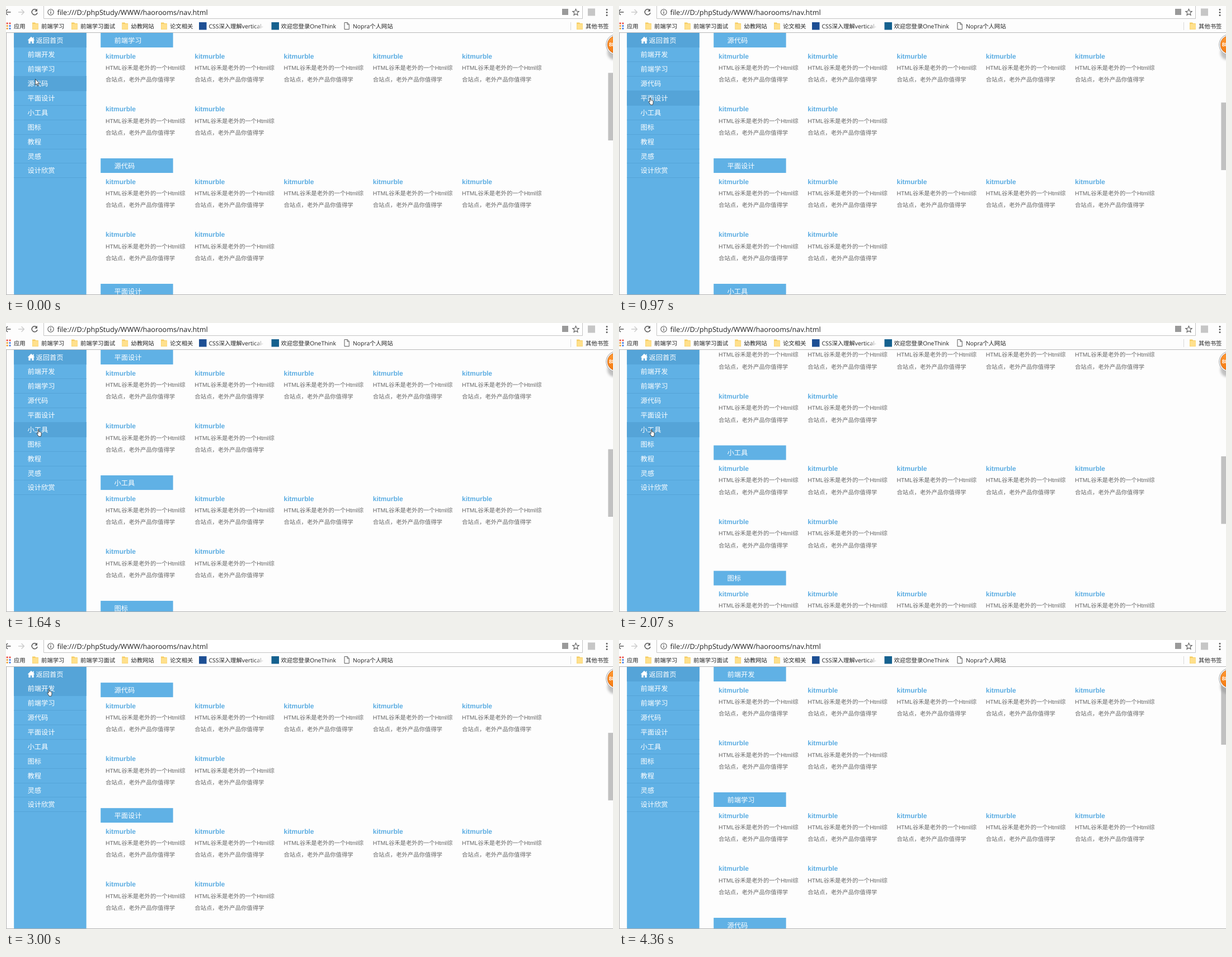
Write an HTML page that moves like this. It is 1085 by 516 pixels and loops after 4780 ms.

```html
<!DOCTYPE html>
<html lang="zh-CN">
<head>
<meta charset="utf-8">
<title>nav</title>
<style>
html, body { margin: 0; width: 100%; height: 100%; overflow: hidden; background: #fdfdfd; }
svg { display: block; width: 1085px; height: 516px; }
text { white-space: pre; cursor: default; text-rendering: geometricPrecision; }
.page text { font: 10.35px "Liberation Sans", "Noto Sans CJK SC", "Noto Sans CJK", sans-serif; fill: #666; }
.page .head { font-size: 12.25px; fill: #fff; }
.page .name { font-size: 12px; font-weight: bold; fill: #5cade2; }
.bar text { font: 10.35px "Open Sans", "Noto Sans CJK SC", "Noto Sans CJK", sans-serif; fill: #222; }
.bar .url { font-size: 12.65px; }
</style>
</head>
<body>
<svg id="stage" viewBox="0 0 1085 516" xmlns="http://www.w3.org/2000/svg">
  <defs>
    <clipPath id="view"><rect x="1" y="48" width="1084" height="467"/></clipPath>
    <linearGradient id="fade" x1="0" x2="1">
      <stop offset="0" stop-color="#fdfdfd" stop-opacity="0"/>
      <stop offset="1" stop-color="#fdfdfd"/>
    </linearGradient>
    <linearGradient id="ball" x1="0" y1="0" x2="0" y2="1">
      <stop offset="0" stop-color="#ff9a35"/>
      <stop offset="1" stop-color="#f57a10"/>
    </linearGradient>
    <filter id="soft" x="-50%" y="-50%" width="200%" height="200%"><feGaussianBlur stdDeviation="2"/></filter>
  </defs>
  <rect width="1085" height="516" fill="#fdfdfd"/>

  <g class="page" clip-path="url(#view)">
    <g id="list"></g>
    <rect id="thumb" x="1076.3" y="66.4" width="9" height="120.6" fill="#c1c1c1"/>
    <rect x="14.2" y="48" width="129.4" height="468" fill="#60b1e5"/>
    <rect x="14.2" y="48" width="129.4" height="26" fill="#55a4d8"/>
    <rect id="hover" x="14.2" y="48" width="129.4" height="26" fill="#55a4d8"/>
    <g id="menu"></g>
    <path d="M45 54.8L38.6 61.2H40.4V67H43.7V63.2H46.3V67H49.6V61.2H51.4L49.6 59.4V55.8H48V57.8Z" fill="#fff"/>
    <ellipse cx="1087" cy="83" rx="12" ry="13" fill="#999" opacity=".6" filter="url(#soft)"/>
    <circle cx="1091" cy="69" r="18.3" fill="#f3f3f3" stroke="#a9a9a9" stroke-width="1"/>
    <circle cx="1091" cy="69" r="15.8" fill="url(#ball)" stroke="#c9651a" stroke-width=".8"/>
    <text x="1077.8" y="72" style="font-size:9.5px;font-weight:bold;fill:#fff">88</text>
  </g>

  <g class="bar">
    <path d="M67.5 0V22.5H1030.5V0" fill="#fff" stroke="#c4c4c4"/>
    <path d="M0 47.5H1085" stroke="#b8b8b8"/>
    <path d="M.5 48V515.5H1085" fill="none" stroke="#a8a8a8" stroke-width=".9"/>
    <g fill="none" stroke="#5a5a5a" stroke-width="1.5">
      <path d="M8.5 11H-2M3 6L-2 11L3 16"/>
      <path d="M22 11H32M27.6 6.3L32.3 11L27.6 15.7" stroke="#cdcdcd"/>
      <path d="M55 7.6A5 5 0 1 0 56 12"/>
      <circle cx="80" cy="11" r="5.2" stroke-width="1.1"/>
      <path d="M80 10V14M80 7.6V9" stroke-width="1.3"/>
      <path d="M1018.5 5.4L1020.1 9.3L1024.2 9.6L1021.1 12.3L1022 16.4L1018.5 14.2L1015 16.4L1015.9 12.3L1012.8 9.6L1016.9 9.3Z" stroke-width="1.1"/>
      <path d="M605 29.6H610.3L613.3 32.8V41.6H605ZM610 29.6V33H613.3" stroke-width="1"/>
      <path d="M1009.5 29V43" stroke="#d8d8d8" stroke-width="1"/>
      <path d="M1074 6.5V16.6" stroke-width="3" stroke-linecap="round" stroke-dasharray="0 5"/>
    </g>
    <path d="M55.9 4.8V9.8H51Z" fill="#5a5a5a"/>
    <rect x="994" y="5" width="11" height="11" fill="#9a9a9a"/>
    <rect x="1040" y="4.5" width="13" height="13" fill="#c6c6c6"/>
    <rect x="345" y="29" width="13.5" height="13.5" fill="#1d4f94"/>
    <rect x="474.5" y="29" width="13.5" height="13.5" fill="#15618f"/>
    <g id="dots"></g>
    <g id="marks"></g>
    <rect x="444" y="28" width="20" height="16" fill="url(#fade)"/>
    <text class="url" x="91.4" y="15.5">file:///D:/phpStudy/WWW/haorooms/nav.html</text>
  </g>

  <g stroke="#222" stroke-width=".8" stroke-linejoin="round" fill="#fff">
    <path id="arrow" d="M.4 .4V11L2.8 8.8L4.4 12.5L6.1 11.8L4.5 8.2H7.7Z"/>
    <path id="hand" d="M2.6 7.8V1.4Q2.6 .4 3.4 .4T4.2 1.4V4.8Q5 4.2 5.7 5Q6.5 4.6 7.1 5.4Q8.4 5.2 8.5 6.6V9.4Q8.4 11 7.6 13H3.7Q2.9 11.2 .8 8.2Q.2 7 1.2 6.8Q2 6.8 2.6 7.8Z"/>
  </g>
</svg>
<script>
const LOOP = 4780, TOP = 48, ROW = 25.87, SECTION = 224;
const topics = ['前端开发', '前端学习', '源代码', '平面设计', '小工具', '图标', '教程', '灵感', '设计欣赏'];
const $ = id => document.getElementById(id);
const rowTop = i => Math.round(TOP - .4 + i * ROW);

function add(parent, tag, attrs, text) {
  const el = document.createElementNS('http://www.w3.org/2000/svg', tag);
  for (const k in attrs) el.setAttribute(k, attrs[k]);
  if (text) el.textContent = text;
  parent.appendChild(el);
  return el;
}

// Sections with seven cards each
topics.forEach((topic, i) => {
  const g = add($('list'), 'g', { transform: `translate(0 ${TOP + i * SECTION})` });
  add(g, 'rect', { x: 169.2, y: 0, width: 129.4, height: 26, fill: '#60b1e5' });
  add(g, 'text', { x: 193.4, y: 17.7, class: 'head' }, topic);
  for (let n = 0; n < 7; n++) {
    const x = 178 + (n % 5) * 159.25, y = n < 5 ? 0 : 94.7;
    add(g, 'text', { x, y: y + 45.6, class: 'name' }, 'kitmurble');
    add(g, 'text', { x, y: y + 65.8 }, 'HTML谷禾是老外的一个Html综');
    add(g, 'text', { x, y: y + 87.3 }, '合站点，老外产品你值得学');
  }
});

// Side menu
['返回首页', ...topics].forEach((label, i) => {
  add($('menu'), 'text', { x: i ? 38.5 : 53.6, y: TOP + i * ROW + 17.6, class: 'head' }, label);
  add($('menu'), 'rect', { x: 14.2, y: rowTop(i + 1), width: 129.4, height: 1, fill: '#55a4d8' });
});

// Bookmarks
[[14, '应用'], [63, '前端学习', 1], [133, '前端学习面试', 1], [223.3, '幼教网站', 1], [293, '论文相关', 1],
 [362.5, 'CSS深入理解vertical-'], [491.5, '欢迎您登录OneThink'], [620, 'Nopra个人网站'], [1036, '其他书签', 1]]
.forEach(([x, label, folder]) => {
  add($('marks'), 'text', { x, y: 39.8 }, label);
  if (folder) {
    add($('marks'), 'path', { d: `M${x - 16} 29.5h5l1.2 1.6h4.6v11h-10.8z`, fill: '#f6cd63' });
    add($('marks'), 'rect', { x: x - 15.4, y: 32, width: 9.8, height: 9.5, fill: '#ffe08c' });
  }
});
['#e8453c', '#e8453c', '#f0a030', '#3b78e7', '#f0a030', '#3b78e7'].forEach((fill, i) =>
  add($('dots'), 'rect', { x: i % 2 ? 5.6 : .8, y: 29.6 + 4.6 * (i >> 1), width: 2.8, height: 2.8, fill }));

// Moments at which the screen refreshes
const ticks = [0, 150, 460, 580, 730, 850, 970, 1250, 1400, 1520, 1640, 2070, 2190, 2310, 2440,
  2580, 2850, 3000, 3120, 3240, 4240, 4360];
// [start, from section, to section], 500 ms each
const scrolls = [[360, 1, 2], [1144, 2, 3], [1907.5, 3, 4], [2740, 4, 0]];
// [time, pointer, x, y, hovered row]
const moves = [
  [0, 'arrow', 52, 130, 3], [150, 'hand', 48.5, 136.5, 3], [850, 'hand', 52, 158, 4],
  [970, 'hand', 52.6, 163.4, 4], [1640, 'hand', 54.6, 189.6, 5], [2440, 'arrow', 78, 92, 1],
  [2580, 'hand', 73.4, 87.2, 1], [4240, 'arrow', 774, 314, 0], [4360, '', 0, 0, 0]
];
const swing = p => .5 - Math.cos(Math.PI * Math.min(1, p)) / 2;

function scrollAt(t) {
  let pos = 1;
  for (const [start, from, to] of scrolls)
    if (t >= start) pos = from + (to - from) * swing((t - start) / 500);
  return pos;
}

const begin = performance.now();
function draw() {
  const now = (performance.now() - begin) % LOOP;
  const t = ticks.filter(k => k <= now).pop();
  const pos = scrollAt(t);
  $('list').setAttribute('transform', `translate(0 ${-pos * SECTION})`);
  $('thumb').setAttribute('y', 66.4 + pos * 53);
  const [, kind, x, y, row] = moves.filter(m => m[0] <= t).pop();
  $('hover').setAttribute('y', rowTop(row));
  for (const id of ['arrow', 'hand']) {
    $(id).setAttribute('visibility', id === kind ? 'visible' : 'hidden');
    $(id).setAttribute('transform', `translate(${x} ${y})`);
  }
  requestAnimationFrame(draw);
}
draw();
</script>
</body>
</html>
```
